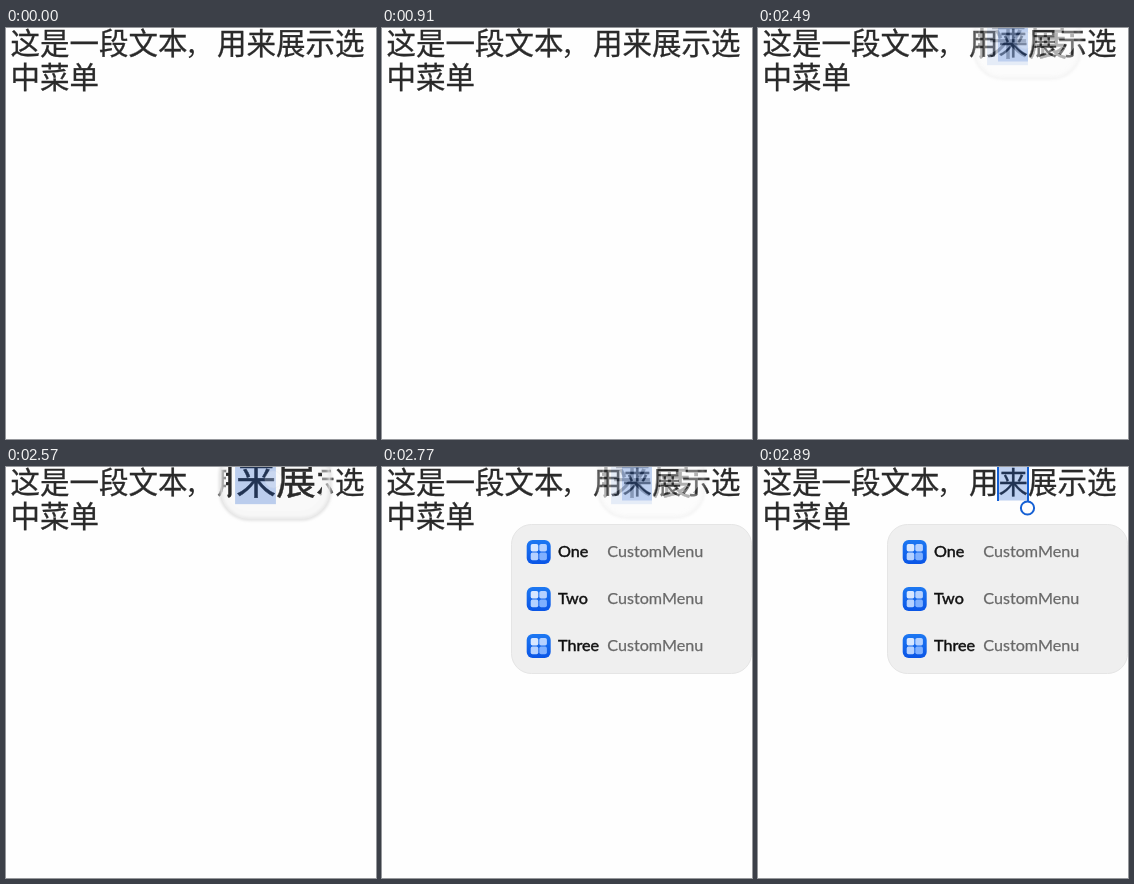
An HTML page that plays this animation: 370 by 411 pixels, repeating every 5090 ms.

```html
<!DOCTYPE html>
<html lang="zh-CN">
<head>
<meta charset="utf-8">
<title>Selection menu</title>
<style>
html, body { margin: 0; width: 100%; height: 100%; overflow: hidden; background: #fefefe; }
svg { display: block; width: 370px; height: 411px; }
.body { font: 400 29.5px "Noto Sans CJK SC", "Noto Sans CJK", sans-serif; fill: #2a2a2a; stroke: #2a2a2a; stroke-width: .3; }
.comma { font-size: 27px; stroke: none; }
.menu { font: 400 16.15px Lato, "Open Sans", sans-serif; }
.key { fill: #111; stroke: #111; stroke-width: .45; }
.val { fill: #686868; stroke: #686868; stroke-width: .25; }
.frame { transform-origin: 268px 0; }
</style>
</head>
<body>
<svg viewBox="0 0 370 411" xmlns="http://www.w3.org/2000/svg">
  <defs>
    <linearGradient id="blue" x1="0" y1="0" x2="0" y2="1">
      <stop offset="0" stop-color="#1d78f2"/>
      <stop offset="1" stop-color="#0a55e6"/>
    </linearGradient>
    <clipPath id="glass"><rect x="220" y="-16" width="96" height="60" rx="23"/></clipPath>
    <filter id="soft" x="-10%" y="-10%" width="120%" height="130%">
      <feGaussianBlur stdDeviation="1.5"/>
    </filter>
    <g id="icon">
      <rect width="24" height="24" rx="6" fill="url(#blue)"/>
      <rect x="4" y="4" width="7.6" height="7.6" rx="1.8" fill="#d8e7ff"/>
      <rect x="12.6" y="4" width="7.6" height="7.6" rx="1.8" fill="#b5d1ff"/>
      <rect x="4" y="12.6" width="7.6" height="7.6" rx="1.8" fill="#b5d1ff"/>
      <rect x="12.6" y="12.6" width="7.6" height="7.6" rx="1.8" fill="#7fb0ff"/>
    </g>
  </defs>

  <g id="text" class="body">
    <text x="4.6" y="26">这是一段文本</text>
    <text x="179" y="27" class="comma">，</text>
    <text x="211.1" y="26">用来展示选</text>
    <text x="4.6" y="60.4">中菜单</text>
  </g>
  <rect id="pick" x="240" y="0" width="30" height="33.5" fill="#0a50c8" fill-opacity=".26"/>

  <g id="lens">
    <g id="frame" class="frame">
      <rect x="214.5" y="-20" width="109.5" height="72" rx="29" fill="none" stroke="#dcdcdc" stroke-width="3" filter="url(#soft)"/>
      <rect x="214.5" y="-20" width="109.5" height="72" rx="29" fill="#f1f1f1" fill-opacity=".5"/>
    </g>
    <g clip-path="url(#glass)">
      <rect x="214" y="-20" width="110" height="74" fill="#f9f9f9"/>
      <g transform="translate(-97.3 -8.4) scale(1.36)">
        <use href="#text"/>
        <use href="#pick"/>
      </g>
    </g>
  </g>

  <circle id="touch" cx="267.5" cy="12.5" r="8.5" fill="#fff" fill-opacity=".6" stroke="#d9d9d9" stroke-opacity=".6"/>

  <g id="handles" fill="none" stroke="#1560d4" stroke-width="2">
    <path d="M240 0V34M270 0V34"/>
    <circle cx="269.5" cy="41" r="6.6" fill="#fefefe"/>
  </g>

  <g id="menu" class="menu">
    <rect x="129.5" y="57.5" width="240" height="149" rx="20" fill="#efefef" stroke="#e5e5e5"/>
  </g>
</svg>
<script>
const LOOP = 5090;
const get = id => document.getElementById(id);
const menu = get('menu');

['One', 'Two', 'Three'].forEach((name, i) => {
  const y = 85 + 47 * i;
  menu.insertAdjacentHTML('beforeend',
    `<use href="#icon" x="144.7" y="${y - 12}"/>
     <text class="key" x="176" y="${y + 5.2}">${name}</text>
     <text class="val" x="225.3" y="${y + 5.2}">CustomMenu</text>`);
});

// Opacity steps: [start in ms, value]
const tracks = {
  touch: [[1870, 1], [2490, .35], [2730, 0]],
  pick: [[2490, 1]],
  lens: [[2490, .36], [2530, .72], [2570, 1], [2730, .7], [2770, .36], [2810, .18], [2850, .06], [2890, 0]],
  menu: [[2730, .6], [2770, 1]],
  handles: [[2850, .5], [2890, 1]]
};
const parts = Object.entries(tracks).map(([id, steps]) => [get(id), steps]);

function valueAt(steps, t) {
  let value = 0;
  for (const [start, v] of steps) if (t >= start) value = v;
  return value;
}

function draw(now) {
  const t = now % LOOP;
  for (const [el, steps] of parts) el.style.opacity = valueAt(steps, t);
  // The frame grows a little as the lens fades in
  get('frame').style.transform = `scale(${0.94 + 0.06 * valueAt(tracks.lens, t)})`;
}

const begin = performance.now();
function tick() {
  draw(performance.now() - begin);
  requestAnimationFrame(tick);
}
tick();
</script>
</body>
</html>
```
